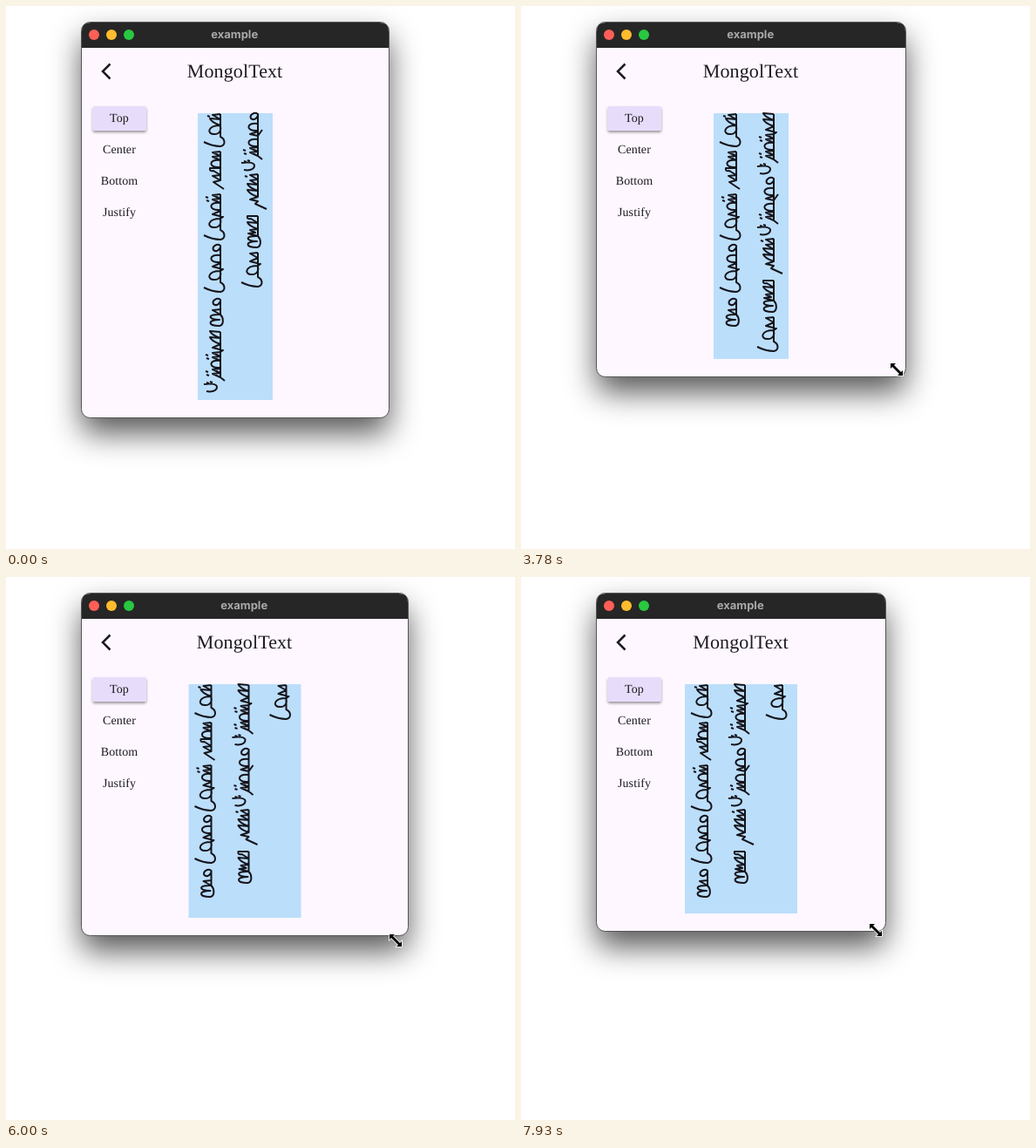
An HTML page that plays this animation: 584x623 px, repeating every 8000 ms.

```html
<!DOCTYPE html>
<html lang="en">
<head>
<meta charset="utf-8">
<title>MongolText</title>
<style>
  html, body { margin: 0; width: 100%; height: 100%; overflow: hidden; background: #fff; }
  svg { display: block; width: 584px; height: 623px; }
  text { text-anchor: middle; fill: #1d1b20; text-rendering: geometricPrecision;
    font-family: "Liberation Serif", "Times New Roman", serif; }
  .heading { font-size: 22px; letter-spacing: .1px; }
  .label { font-size: 14px; letter-spacing: .1px; }
  .caption { font: 700 13px Inter, "Liberation Sans", sans-serif; fill: #a9a9a9; }
  .word { fill: none; stroke: #15141a; stroke-width: 2; stroke-linejoin: round; }
  .pointer { stroke: #fff; stroke-width: 1.6; paint-order: stroke; }
</style>
</head>
<body>
<svg id="stage" viewBox="0 0 584 623">
  <defs>
    <filter id="blur" filterUnits="userSpaceOnUse" x="0" y="-40" width="584" height="760">
      <feGaussianBlur stdDeviation="17.5"/>
    </filter>
    <filter id="lift" x="-20%" y="-40%" width="140%" height="200%">
      <feDropShadow dx="0" dy="2" stdDeviation="1.5" flood-opacity=".4"/>
    </filter>
  </defs>
  <rect id="shadow" x="87" y="36" rx="10" fill="#000" fill-opacity=".66" filter="url(#blur)"/>
  <rect id="body" x="86.500" y="18.500" rx="10" fill="#fef7ff" stroke="#555"/>
  <path id="bar" fill="#262626"/>
  <circle cx="101" cy="33" r="6" fill="#ff5f57"/>
  <circle cx="121" cy="33" r="6" fill="#febc2e"/>
  <circle cx="141" cy="33" r="6" fill="#28c840"/>
  <path d="M119.500 66.500L111 75l8.500 8.500" fill="none" stroke="#1d1b20" stroke-width="2.500"/>
  <rect x="99.500" y="115" width="61.500" height="28" rx="2" fill="#e7ddfb" filter="url(#lift)"/>
  <g id="labels"></g>
  <text id="caption" class="caption" y="37">example</text>
  <text id="heading" class="heading" y="82">MongolText</text>
  <rect id="panel" y="123" fill="#bbdefb"/>
  <g id="words"></g>
  <path id="arrow" class="pointer" d="M0 0v14l3.300-3 2.300 5.500 2.500-1-2.300-5.300h4.500z"/>
  <path id="resize" class="pointer" d="M-7-7h6l-2 2 8 8 2-2v6h-6l2-2-8-8-2 2z"/>
</svg>
<script>
const LOOP = 8000, DRAG_START = 1990, STEP = 148.4;
const TOP = 123, COLUMN = 43, SPINE = 26;
const $ = id => document.getElementById(id);

function set(el, attrs) {
  for (const k in attrs) el.setAttribute(k, attrs[k]);
}
function add(parent, tag, attrs) {
  const el = document.createElementNS('http://www.w3.org/2000/svg', tag);
  set(el, attrs);
  parent.append(el);
  return el;
}

['Top', 'Center', 'Bottom', 'Justify'].forEach((name, i) => {
  add($('labels'), 'text', { class: 'label', x: 130, y: 133 + i * 36 }).textContent = name;
});

// Letter strokes run down the spine: [advance, relative path].
// Capital letters and u are final forms and carry their own tail.
const tooth = 'l-9 1l9 4';
const letters = {
  n: [6, 'm-15 2l3 1m12-3l-9 1l9 5'],
  a: [6, 'l-9 1l9 5'],
  i: [7, 'l-12-1q1 4 12 8'],
  o: [9, 'c-14-2-14 9-1 8l1 1'],
  y: [8, 'l-12 0q-1 4 4 3l8 5'],
  r: [9, 'l-9 4l12 3l-3 2'],
  h: [10, tooth + tooth],
  g: [10, 'm-17 3l3 1m-2 3l3 1m13-8' + tooth + tooth],
  b: [13, 'c-15 0-16 10-7 10c7 0 8-6 7-9v12'],
  d: [11, 'c-4-3-10 1-8 5c3 3 9-1 8-5v11'],
  l: [9, 'l-9 3l9 2l5-7m-5 7v4'],
  s: [8, 'l-9 1l6 3l-8 1l11 3'],
  E: [0, 'c6 3 6 10 0 11c-6 0-13-2-19-5'],
  A: [0, 'l5 4m-17 1l3 1m-7 0l3 1m-6 1c5-1 15-1 15 3c0 5-7 6-12 5'],
  R: [0, 'l-8 2l12 8'],
  N: [0, 'l-9 3l9 2l-3 3l13 6'],
  u: [0, 'c-15-1-15 6-1 6c-14 0-14 7 0 7c5-1 5-9 1-13']
};

// [letters, height, advance to the next word]
const words = [
  ['nibE', 38, 43], ['hoyaR', 43, 49], ['gorbE', 53, 59], ['dorbE', 55, 62],
  ['dau', 31, 37], ['iirgogA', 67, 74], ['dologA', 62, 69], ['naiiN', 41, 48],
  ['yisu', 35, 42], ['arbE', 43, 43]
].map(([spelling, height, advance]) => {
  const parts = [...spelling].map(c => letters[c]);
  const spine = parts.reduce((sum, p) => sum + p[0], 0);
  const d = `M0 0V${spine}M0 0` + parts.map(p => p[1]).join('');
  return { height, advance, el: add($('words'), 'path', { class: 'word', d }) };
});

// Drag: [step, right, bottom, pointer lead x, pointer lead y]
const drag = [
  [0, 439, 485, 0, 20], [4, 440, 570, 0, 8], [6, 440, 596, 0, -3], [7, 440, 589, 0, -7],
  [9, 440, 545, 0, -12], [12, 441, 425, 1, -7], [14, 447, 367, 2, -5], [16, 456, 345, 2, -3],
  [21, 475, 321, 0, 0], [23, 479, 345, 0, 6], [24, 478, 366, -2, 7], [26, 468, 403, -3, 7],
  [30, 439, 428, -4, 7], [33, 428, 464, -3, 6], [35, 415, 489, 0, 0], [38, 416, 441, 0, -7],
  [40, 418, 406, 0, 0]
];

// Pointer approach: [time, x, y]
const approach = [[500, 404, 572], [650, 409, 546], [800, 415, 517], [950, 422, 490], [1090, 428, 472]];

function slope(i, c) {
  const a = drag[Math.max(i - 1, 0)], b = drag[Math.min(i + 1, drag.length - 1)];
  return (b[c] - a[c]) / (b[0] - a[0]);
}

// Cubic Hermite through the drag keys
function sample(s, c) {
  let i = 0;
  while (i < drag.length - 2 && s >= drag[i + 1][0]) i++;
  const p = drag[i], q = drag[i + 1], span = q[0] - p[0], u = (s - p[0]) / span;
  const v = 1 - u;
  return Math.round(v * v * (1 + 2 * u) * p[c] + u * u * (3 - 2 * u) * q[c]
    + span * u * v * (v * slope(i, c) - u * slope(i + 1, c)));
}

function place(el, at) {
  set(el, at ? { transform: `translate(${at[0]} ${at[1]})`, display: 'inline' } : { display: 'none' });
}

function layout(right, bottom) {
  const width = right - 87, mid = 87 + width / 2, height = bottom - 20 - TOP;
  set($('shadow'), { width, height: bottom - 18 });
  set($('body'), { width: width + 1, height: bottom - 18 });
  set($('bar'), { d: `M87 48V29q0-10 10-10H${right - 10}q10 0 10 10V48z` });
  set($('caption'), { x: mid - .8 });
  set($('heading'), { x: mid - .4 });

  let col = 0, y = 0;
  const spots = words.map(w => {
    if (y && y + w.height > height) { col++; y = 0; }
    const spot = [col, y];
    y += w.advance;
    return spot;
  });
  const panelWidth = (col + 1) * COLUMN, left = mid - panelWidth / 2;
  set($('panel'), { x: left, width: panelWidth, height });
  words.forEach((w, i) => place(w.el, [left + SPINE + spots[i][0] * COLUMN, TOP + 1 + spots[i][1]]));
}

function render(t) {
  let right = 439, bottom = 472, arrow = null, resize = null;
  if (t >= DRAG_START) {
    const s = Math.min(40, Math.floor((t - DRAG_START) / STEP));
    right = sample(s, 1);
    bottom = sample(s, 2);
    resize = [right - 11 + sample(s, 3), bottom - 1 + sample(s, 4)];
  } else {
    const now = approach.filter(p => t >= p[0]).pop();
    if (now && now[0] < 1090) arrow = now.slice(1);
    else if (now) resize = now.slice(1);
  }
  layout(right, bottom);
  place($('arrow'), arrow);
  place($('resize'), resize);
}

const start = performance.now();
function tick() {
  render((performance.now() - start) % LOOP);
  requestAnimationFrame(tick);
}
tick();
</script>
</body>
</html>
```
